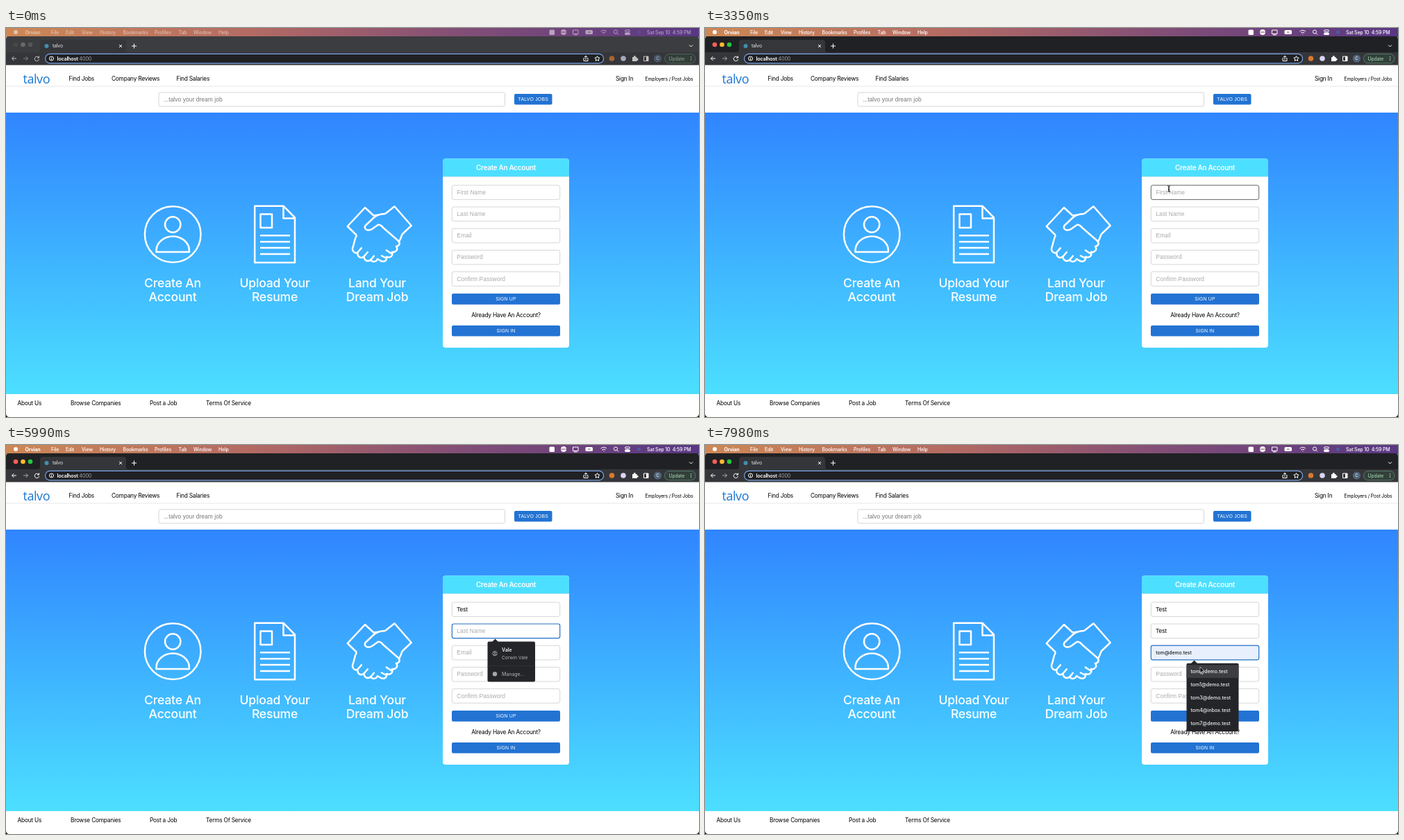
These frames come from a looping animation (998x561 px, 8000 ms). An HTML page:

```html
<!DOCTYPE html>
<html lang="en">
<head>
<meta charset="utf-8">
<title>Job board sign-up</title>
<style>
html, body { margin: 0; width: 100%; height: 100%; overflow: hidden; background: #fff; }
svg { display: block; }
text { font: 8.3px Inter, sans-serif; letter-spacing: -.025em; white-space: pre; }
.mid { text-anchor: middle; }
.menu text { font-size: 7px; font-weight: 500; fill: #fff; }
.menu .b { font-weight: 700; }
.small { font-size: 6.9px; }
.form, .hint { font: 8.4px "Liberation Sans", Arial, sans-serif; letter-spacing: .08px; }
.hint { fill: #a9a9a9; }
.btn { font: 6.9px "Liberation Sans", Arial, sans-serif; letter-spacing: .19px; fill: #fff; text-anchor: middle; }
.head { font-size: 17.6px; font-weight: 500; letter-spacing: -.012em; fill: #fff; text-anchor: middle; }
.pop text { font-size: 7px; font-weight: 500; fill: #f1f1f2; letter-spacing: 0; }
.pop .soft { fill: #b4b5b8; font-weight: 400; }
.line { fill: none; stroke: #fff; stroke-width: 2.5; stroke-linejoin: round; }
.thin { fill: none; stroke: #fff; stroke-width: 1; }
</style>
</head>
<body>
<svg width="998" height="561" viewBox="0 0 998 561">
  <defs>
    <linearGradient id="sky" x2="0" y2="1"><stop stop-color="#3085ff"/><stop offset="1" stop-color="#4cdfff"/></linearGradient>
    <linearGradient id="bar"><stop stop-color="#cd8855"/><stop offset=".35" stop-color="#b46b63"/><stop offset=".65" stop-color="#834f76"/><stop offset="1" stop-color="#583784"/></linearGradient>
  </defs>

  <!-- Menu bar -->
  <rect width="998" height="13" fill="url(#bar)"/>
  <g class="menu" id="menu">
    <circle cx="14" cy="6" r="3" fill="#fff"/>
    <text class="b" x="27.5" y="8.5">Orvian</text>
    <text x="65" y="8.5">File</text><text x="86" y="8.5">Edit</text><text x="109" y="8.5">View</text>
    <text x="135" y="8.5">History</text><text x="168.5" y="8.5">Bookmarks</text><text x="214" y="8.5">Profiles</text>
    <text x="248.5" y="8.5">Tab</text><text x="270" y="8.5">Window</text><text x="306" y="8.5">Help</text>
    <text x="923" y="8.5">Sat Sep 10  4:59 PM</text>
    <rect x="782.5" y="2.5" width="7.5" height="7.5" rx="1.5" fill="#fff"/>
    <circle cx="803" cy="6" r="4" fill="#fff"/><path d="M799.5 6h7" stroke="#75425f"/>
    <path class="thin" d="M816.5 3h7.500v5.500h-7.500zM818 10h4.500"/>
    <rect x="834.5" y="3" width="10.5" height="6" rx="1.5" fill="#fff"/><path d="M838 6h3.500" stroke="#75425f"/>
    <path class="thin" d="M856.5 5a6 6 0 0 1 8.500 0M858.3 7a4 4 0 0 1 5 0M860.3 8.800h1"/>
    <circle class="thin" cx="878" cy="5.5" r="2.6"/><path class="thin" d="M880 7.500l2 2"/>
    <rect class="thin" x="891.5" y="2.8" width="7" height="2.5" rx="1.2"/><rect x="891" y="6.5" width="8" height="3.5" rx="1.7" fill="#fff"/>
    <circle cx="911.5" cy="6" r="2.500" fill="#4b5f9c"/>
  </g>

  <!-- Browser frame -->
  <path id="strip" d="M0 53V16q0-4 4-4H994q4 0 4 4V53z"/>
  <path d="M0 35H45q4 0 4-4V21q0-4 4-4H169q4 0 4 4V31q0 4 4 4H998V54H0z" fill="#35363a"/>
  <g id="lights"><circle cx="14" cy="24" r="3.3" fill="#ff5f57"/><circle cx="24.5" cy="24" r="3.3" fill="#febc2e"/><circle cx="35" cy="24" r="3.3" fill="#28c840"/></g>
  <circle cx="58.5" cy="26" r="3" fill="#3f91ad"/>
  <text class="small" x="67" y="28.3" fill="#e8eaed">talvo</text>
  <path class="thin" d="M163 24l4 4m0-4l-4 4M181 26h7m-3.500-3.500v7M984 24.500l2.500 2.500 2.500-2.500"/>
  <rect x="56.6" y="37.4" width="804" height="13.5" rx="6.7" fill="#202124" stroke="#7ba7ea" stroke-width="1.2"/>
  <g class="thin">
    <circle cx="65.5" cy="44" r="3"/><path d="M65.5 43.500v2.500M65.5 41.800v.8"/>
    <path d="M833 43.500h-1v4h6v-4h-1M835 46v-6m-2 2l2-2 2 2"/>
    <path d="M851.5 40.500l1.100 2.300 2.500.3-1.800 1.800.4 2.500-2.200-1.200-2.200 1.200.4-2.500-1.800-1.800 2.500-.3z"/>
  </g>
  <text x="73.5" y="46.7" fill="#fff" style="font-size:7.2px;font-weight:600">localhost<tspan fill="#a0a3a8" font-weight="400">:4000</tspan></text>
  <g id="tools">
    <path class="thin" d="M15 44H8.500m3-3l-3 3 3 3"/>
    <path class="thin" d="M25 44h6.500m-3-3l3 3-3 3" opacity=".55"/>
    <path class="thin" d="M47 42.500a3.200 3.200 0 1 0 .6 2.500M47.5 40.500v2.500h-2.500"/>
    <circle cx="872.5" cy="44" r="3.8" fill="#d9792f"/>
    <circle cx="889" cy="44" r="3.8" fill="#d9d6f5"/>
    <path d="M902 42h2a1.400 1.400 0 1 1 2.600 0h2v2a1.400 1.400 0 1 1 0 2.500v1.500h-6.600z" fill="#fff"/>
    <path class="thin" d="M918.5 41h6.500v6.500h-6.500z"/><path d="M922 41h3v6.500h-3z" fill="#fff"/>
    <circle cx="938.5" cy="44" r="5.6" fill="#50647a"/><text class="mid" x="938.5" y="46.3" fill="#fff" style="font-size:6.3px">C</text>
    <rect x="948.5" y="37.5" width="44.5" height="13.3" rx="6.6" fill="#33403b" stroke="#5f8b72" stroke-width=".8"/>
    <text class="small" x="954.5" y="46.6" fill="#a8dab5">Update</text>
    <path d="M986.5 41v1.300m0 1.100v1.300m0 1.100v1.300" stroke="#a8dab5" stroke-width="1.3"/>
  </g>

  <!-- Page -->
  <rect y="53.5" width="998" height="508" fill="#fff"/>
  <path d="M0 84H998" stroke="#e2e2e2" stroke-width=".8"/>
  <text x="24.5" y="79.5" fill="#1976d2" style="font:18px 'Open Sans',sans-serif">talvo</text>
  <text x="90.5" y="76">Find Jobs</text><text x="152" y="76">Company Reviews</text><text x="245.5" y="76">Find Salaries</text>
  <text x="878" y="76">Sign In</text><text class="small" x="920.5" y="75.5">Employers / Post Jobs</text>
  <rect x="220" y="93" width="498.5" height="20" rx="2.5" fill="#fff" stroke="#c4c4c4" stroke-width=".7"/>
  <text class="form" x="227" y="105.6" fill="#757575">...talvo your dream job</text>
  <rect x="732" y="95" width="54.5" height="15.5" rx="2" fill="#2273d3"/><text class="btn" x="759.3" y="105.2">TALVO JOBS</text>
  <rect y="122" width="998" height="406" fill="url(#sky)"/>

  <g class="line">
    <circle cx="240.2" cy="297.6" r="40.3"/><circle cx="240.2" cy="283.5" r="11.2"/>
    <path d="M216.5 323v-2a23.700 20.500 0 0 1 47.400 0v2z"/>
    <path d="M358.2 256.700H399.500L416 273.500V338.300H358.200zM399.5 256.700V274.500H416M366.5 268.500H383V288H366.500zM366 299.300H409M366 308.300H409M366 317H409M366 326H409"/>
    <path d="M529.5 270.500L517 259L491.800 286L505 299M546 268L559.500 257.300L583.700 285L570.500 297.500"/>
    <path d="M505 299C501 306 502 311 499.500 316c-2 6 3 10 7 7.500c-1 7 5 9.500 9 6c0 6 6 8.500 10 4.500c1 4 8 4 9.500-1l5 3c5 2 9-1 8-6c5 2 10-1 8-7c6 1 9-4 6-8c5-1 6-5 3-8L542 287"/>
    <path d="M546 268C538 268 532 270 527 276L517.500 285c-3 6 5 9 11 4l7-5c3-1 5 1 7 3M529.5 270.500L536 269.500M570.500 297.500C569 302 568 306 565 309M506.5 323.500l6-7M515.5 329.500l6-7M525.5 334l5-6M540 328l8 4M547 320l9 6"/>
  </g>
  <text class="head" x="240" y="373.500">Create An</text><text class="head" x="240" y="394">Account</text>
  <text class="head" x="387" y="373.500">Upload Your</text><text class="head" x="387" y="394">Resume</text>
  <text class="head" x="534.500" y="373.500">Land Your</text><text class="head" x="534.500" y="394">Dream Job</text>

  <rect x="629" y="188.5" width="182" height="272.5" rx="4" fill="#fff"/>
  <path d="M629 214.500V192.500q0-4 4-4H807q4 0 4 4V214.500z" fill="#4ddfff"/>
  <path d="M629 214.500H811" stroke="#c8e6ee" stroke-width=".7"/>
  <text class="mid" x="720" y="205.3" fill="#fff" style="font-size:9.9px;font-weight:600">Create An Account</text>
  <rect x="642" y="383" width="156" height="15.8" rx="2" fill="#2273d3"/><text class="btn" x="720" y="393">SIGN UP</text>
  <text class="mid" x="720" y="417">Already Have An Account?</text>
  <rect x="642" y="429" width="156" height="15.5" rx="2" fill="#2273d3"/><text class="btn" x="720" y="439">SIGN IN</text>

  <text x="16.5" y="544.3">About Us</text><text x="93" y="544.3">Browse Companies</text>
  <text x="207" y="544.3">Post a Job</text><text x="288" y="544.3">Terms Of Service</text>
  <path d="M0 556q0 5 5 5H0zM998 556q0 5-5 5h5z"/>
  <g id="live"></g>
</svg>
<script>
const LOOP = 8000, START = performance.now();
const $ = id => document.getElementById(id);
const pen = document.createElement('canvas').getContext('2d');
pen.font = '8.4px "Liberation Sans", Arial, sans-serif';

// Every track is a list of [time, ...values]; a value holds until the next time.
const at = (track, t) => track.findLast(k => k[0] <= t);

const labels = ['First Name', 'Last Name', 'Email', 'Password', 'Confirm Password'];
const typed = [
  [[0, ''], [4320, 'T'], [4650, 'Te'], [4800, 'Tes'], [4880, 'Test']],
  [[0, ''], [6070, 'T'], [6490, 'Te'], [6650, 'Tes'], [6730, 'Test']],
  [[0, ''], [7200, 't'], [7430, 'to'], [7830, 'tom@demo.test']],
  [[0, '']], [[0, '']]
];
const PREVIEW = 7830;
const focus = [[0, -1], [1960, 0], [3020, -1], [3660, 0], [5270, 1], [7030, 2]];
const hover = [[0, -1], [1400, 0], [1960, -1], [3270, 0], [3660, -1]];

const first = ['Tests', 'Test', 'test', 'Test1', 'test1', 'test3'];
const last = ['Test', 'test', 'Test1', 'test1', 'Tests'];
const mails = ['corvale731@mail.test', 'tom@demo.test', 'zip@zap', 'tom1@demo.test', 'oakpine@mail.test', 'elm@el.test'];
const matches = ['tom@demo.test', 'tom1@demo.test', 'tom3@demo.test', 'tom4@inbox.test', 'tom7@demo.test'];
// A popup is either a profile (a name) or a list with its width.
const popups = [
  [0], [1960, 'Corwin'], [3020], [3660, 'Corwin'], [4410, first, 37.5],
  [5270, 'Vale'], [6070, last, 37.5], [7030, mails, 100], [7430, matches, 75]
];

const A = 'arrow', I = 'beam';
const pointer = [
  [0], [190, 60, 310, A], [270, 463, 274, A], [510, 530, 264, A], [590, 600, 254, A], [670, 653, 247, A],
  [840, 668, 242, A], [920, 680, 240, I], [1730, 680, 238.5, I], [1800, 680, 237, I],
  [2860, 780, 150, A], [2940, 963, 5, A], [3020, 870, 60, A], [3100, 700, 140, A], [3180, 561, 205, A],
  [3270, 640, 229, I], [3350, 668, 232, I], [4320],
  [4730, 660, 246, I], [4800, 657, 254, A], [4950, 657, 257, A], [5030, 656, 265, I], [5190, 656, 268, I], [5990],
  [6800, 660, 281, A], [6880, 667, 295, I], [6950, 672, 300, I], [7200],
  [7280, 680, 306, I], [7350, 687, 311, A], [7430, 695, 313, A], [7510, 703, 315, A], [7590, 708, 316, A],
  [7750, 710, 317, A], [7830, 711, 318, A], [7910, 712, 319, A], [7980, 713, 320, A]
];

const rect = (x, y, w, h, r, attrs) => `<rect x="${x}" y="${y}" width="${w}" height="${h}" rx="${r}" ${attrs}/>`;
const text = (x, y, cls, s, style = '') => `<text x="${x}" y="${y}" class="${cls}" style="${style}">${s}</text>`;
const rowY = i => 226.8 + i * 31.2;

function field(i, t) {
  const y = rowY(i), [edited, value] = at(typed[i], t), [since, active] = at(focus, t);
  const on = active === i, preview = i === 2 && t >= PREVIEW;
  const stroke = on ? '#2470c4' : at(hover, t)[1] === i ? '#222' : '#c4c4c4';
  let out = rect(642.3, y, 155.4, 20.6, 2.5,
    `fill="${preview ? '#e8f0fe' : '#fff'}" stroke="${stroke}" stroke-width="${on ? 1.2 : .7}"`);
  out += text(649.3, y + 13, value ? 'form' : 'hint', value || labels[i],
    preview ? 'font:7px Inter,sans-serif;letter-spacing:-.01em' : '');
  if (on && !preview && (t - Math.max(since, edited)) % 1000 < 500) {
    const x = 649.2 + pen.measureText(value).width + value.length * .08;
    out += rect(x, y + 5.2, .8, 10, 0, 'fill="#000"');
  }
  return out;
}

function popup(t) {
  const [, content, listWidth] = at(popups, t);
  if (!content) return '';
  const y = rowY(at(focus, t)[1]) + 25.6, profile = typeof content === 'string';
  const w = profile ? 68.5 : listWidth, h = profile ? 58 : 4.8 + content.length * 18.7;
  let out = rect(693.5, y, w, h, 2, 'fill="#242528"') + `<path d="M700 ${y + .3}l4.500-4.500 4.500 4.500z" fill="#242528"/>`;
  if (profile) {
    out += `<g fill="none" stroke="#b4b5b8" stroke-width=".8"><circle cx="704" cy="${y + 17}" r="3.2"/>
      <circle cx="704" cy="${y + 16}" r="1"/><path d="M702 ${y + 19.3}q2-2.500 4 0"/></g>
      <path d="M693.5 ${y + 35}h68.500" stroke="#35363a" stroke-width=".8"/>
      <circle cx="704" cy="${y + 46.7}" r="3.2" fill="#a5a6a9"/>`
      + text(714, y + 14.3, '', content, 'font-weight:600')
      + text(714, y + 25, 'soft', 'Corwin Vale', 'font-size:6.6px')
      + text(714, y + 49.2, 'soft', 'Manage...');
  } else {
    if (t >= PREVIEW) out += rect(693.5, y + 2.4, w, 18.7, 0, 'fill="#3d3e41"');
    content.forEach((s, i) => out += text(699.5, y + 14.3 + i * 18.7, '', s));
  }
  return `<g class="pop">${out}</g>`;
}

function cursor(t) {
  const [, x, y, kind] = at(pointer, t);
  if (!kind) return '';
  const shape = kind === A
    ? '<path d="M0 0V8.500l2-1.800 1.300 2.900 1.300-.6-1.300-2.800h2.700z" fill="#000" stroke="#fff" stroke-width=".6"/>'
    : '<path d="M-2-4.500q2 0 2 1.500V3q0 1.500-2 1.500M2-4.500q-2 0-2 1.500V3q0 1.500 2 1.500M-1 .8h2" fill="none" stroke="#111" stroke-width=".9"/>';
  return `<g transform="translate(${x} ${y})">${shape}</g>`;
}

let shown;
function draw() {
  const t = (performance.now() - START) % LOOP, awake = t >= 1320;
  $('menu').setAttribute('opacity', awake ? 1 : .5);
  $('tools').setAttribute('opacity', awake ? 1 : .7);
  $('strip').setAttribute('fill', awake ? '#202124' : '#3c3d40');
  $('lights').setAttribute('style', awake ? '' : 'filter:grayscale(1) brightness(.55)');
  const markup = labels.map((_, i) => field(i, t)).join('') + popup(t) + cursor(t);
  if (markup !== shown) $('live').innerHTML = shown = markup;
  requestAnimationFrame(draw);
}
draw();
</script>
</body>
</html>
```
